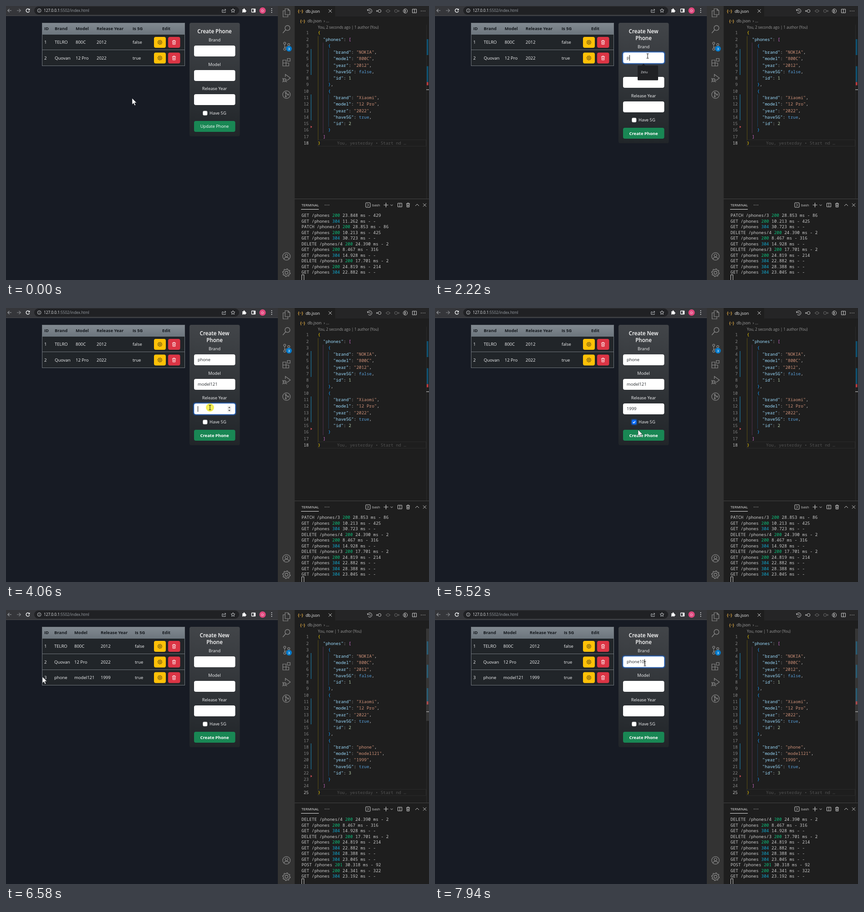
Animation, 929 px wide and 603 px high, one loop 8 s. Source, as an HTML page with a canvas:

```html
<!DOCTYPE html>
<html lang="en">
<head>
<meta charset="utf-8">
<title>Phone list</title>
<style>
html, body { margin: 0; width: 100%; height: 100%; overflow: hidden; background: #171b24; }
canvas { display: block; }
</style>
</head>
<body>
<canvas id="stage" width="929" height="603"></canvas>
<script>
const ctx = document.getElementById('stage').getContext('2d');
const LOOP = 8000, TAU = Math.PI * 2;
const UI = '"Open Sans", "Noto Sans", sans-serif';
const MONO = '"Noto Sans Mono", "DejaVu Sans Mono", monospace';

// ---------- drawing helpers ----------
function rect(x, y, w, h, fill) { ctx.fillStyle = fill; ctx.fillRect(x, y, w, h); }

function box(x, y, w, h, r, fill, stroke, lw = 1) {
  ctx.beginPath();
  ctx.roundRect(x, y, w, h, r);
  if (fill) { ctx.fillStyle = fill; ctx.fill(); }
  if (stroke) { ctx.strokeStyle = stroke; ctx.lineWidth = lw; ctx.stroke(); }
}

function disc(x, y, r, fill) {
  ctx.beginPath(); ctx.arc(x, y, r, 0, TAU); ctx.fillStyle = fill; ctx.fill();
}

// Writes text centred vertically on cy and returns its width.
function text(s, x, cy, size, color, { weight = 400, align = 'left', font = UI } = {}) {
  ctx.font = `${weight} ${size}px ${font}`;
  ctx.textAlign = align;
  ctx.fillStyle = color;
  ctx.fillText(s, x, cy + size * 0.36);
  return ctx.measureText(s).width;
}

// Draws path data centred on (x, y); filled when lw is 0.
function icon(d, x, y, color, lw = 1, scale = 1) {
  ctx.save();
  ctx.translate(x, y);
  ctx.scale(scale, scale);
  const p = new Path2D(d);
  if (lw) { ctx.strokeStyle = color; ctx.lineWidth = lw; ctx.stroke(p); }
  else { ctx.fillStyle = color; ctx.fill(p); }
  ctx.restore();
}

function gear(x, y, r, color, lw) {
  ctx.beginPath();
  for (let i = 0; i <= 32; i++) {
    const a = (i + 0.5) / 32 * TAU, k = i % 4 < 2 ? r : r * 0.78;
    ctx.lineTo(x + Math.cos(a) * k, y + Math.sin(a) * k);
  }
  ctx.closePath();
  ctx.moveTo(x + r * 0.38, y);
  ctx.arc(x, y, r * 0.38, 0, TAU);
  ctx.strokeStyle = color; ctx.lineWidth = lw; ctx.stroke();
}

function gradient(y, h, top, bottom) {
  const g = ctx.createLinearGradient(0, y, 0, y + h);
  g.addColorStop(0, top);
  g.addColorStop(1, bottom);
  return g;
}

const ring = (r, x = 0, y = 0) => `M${x + r} ${y}a${r} ${r} 0 1 1 ${-2 * r} 0a${r} ${r} 0 1 1 ${2 * r} 0`;
const CROSS = 'M-3.5-3.5L3.5 3.5M3.5-3.5L-3.5 3.5';
const TRASH = 'M-4-3H4M-1.5-3V-4.3H1.5V-3M-3-3L-2.6 4.5H2.6L3-3M-1-1V3M1-1V3';
const SPLIT = 'M-4.5-4H4.5V4H-4.5ZM0-4V4';
const DOTS = ring(0.8, -4) + ring(0.8) + ring(0.8, 4);

// ---------- data ----------
const phones = [
  { brand: 'NOKIA', model: '800C', year: '2012', have5G: false, id: 1 },
  { brand: 'Xiaomi', model: '12 Pro', year: '2022', have5G: true, id: 2 },
  { brand: 'phone', model: 'model121', year: '1999', have5G: true, id: 3 }
];
const labels = ['TELRO', 'Quovan', 'phone'];
const recent = ['Zelu', 'phone', 'phone1', 'brand', 'test', 'new'];

const logs = [
  'GET /phones 200 23.848 ms - 429', 'GET /phones 304 11.262 ms - -',
  'PATCH /phones/3 200 28.853 ms - 86', 'GET /phones 200 10.213 ms - 425',
  'GET /phones 304 30.723 ms - -', 'DELETE /phones/4 200 24.390 ms - 2',
  'GET /phones 200 8.467 ms - 316', 'GET /phones 304 14.928 ms - -',
  'DELETE /phones/3 200 17.701 ms - 2', 'GET /phones 200 24.819 ms - 214',
  'GET /phones 304 22.882 ms - -', 'GET /phones 304 28.388 ms - -',
  'GET /phones 304 23.045 ms - -', 'POST /phones 201 30.318 ms - 92',
  'GET /phones 200 24.341 ms - 322', 'GET /phones 304 23.192 ms - -'
];
const logTimes = [780, 860, 5640, 5680, 5720];

// Pointer stops: time, x, y
const stops = [
  [120, 277, 203], [560, 54, 12], [1240, 54, 12], [1700, 467, 110],
  [3480, 467, 110], [3980, 448, 219], [4860, 448, 219], [5000, 437, 251],
  [5240, 437, 251], [5520, 446, 268], [5570, 449, 276], [5740, 449, 276],
  [6520, 80, 147], [6580, 80, 147], [6780, 198, 149], [7240, 461, 118]
];
const clicks = [580, 1740, 4030, 5030, 5590, 7280];

const RELOAD = 700, SENT = 5680, SYNCED = 6000;

// ---------- timing ----------
const typed = (s, t, start, step) => s.slice(0, Math.max(0, Math.floor((t - start) / step) + 1));
const within = (t, a, b) => t >= a && t < b;

function pointer(t) {
  let a = stops[0];
  for (const b of stops) {
    if (t < b[0]) {
      if (a === b) break;
      const p = (t - a[0]) / (b[0] - a[0]), e = p * p * (3 - 2 * p);
      return [a[1] + (b[1] - a[1]) * e, a[2] + (b[2] - a[2]) * e];
    }
    a = b;
  }
  return [a[1], a[2]];
}

function formState(t) {
  const f = { brand: '', model: '', year: '', checked: false, focus: '', hints: 0 };
  if (t < SENT) {
    f.brand = t < 2220 ? '' : 'p' + typed('hone', t, 2380, 76.6);
    f.model = typed('model121', t, 2763, 76.6);
    f.year = typed('1999', t, 4360, 160);
    f.checked = t >= 5050;
    f.focus = t < 1740 ? '' : t < 2686 ? 'brand' : t < 4040 ? 'model' : t < 5040 ? 'year' : t < 5600 ? 'check' : '';
    f.hints = within(t, 1860, 2220) ? 6 : within(t, 2220, 2240) ? 1 : 0;
  } else if (t >= 7280) {
    f.focus = 'brand';
    f.brand = typed('phone10', t, 7460, 80);
    f.hints = within(t, 7360, 7460) ? 6 : within(t, 7460, 7480) ? 1 : 0;
  }
  return f;
}

// ---------- browser ----------
function toolbar(hover) {
  rect(0, 0, 598, 21, '#35363a');
  rect(0, 21, 598, 1, '#4a4c50');
  box(62, 1, 450, 18, 9, '#202124');
  if (hover) disc(48, 10, 9, '#54565a');
  icon('M4 0H-4M-0.5-3.7L-4.2 0L-0.5 3.7', 8, 10, '#9a9ca0', 1.2);
  icon('M-4 0H4M0.5-3.7L4.2 0L0.5 3.7', 28, 10, '#85878b', 1.2);
  icon('M3.4-1.7A3.8 3.8 0 1 0 3.6 1.2', 48, 10, '#f1f3f4', 1.5);
  icon('M4.4-4.5V-0.5H0.4Z', 48, 10, '#f1f3f4', 0);
  icon(ring(3.9) + 'M0-0.5V2.2M0-2.3V-1.3', 73, 10, '#c4c7ca', 1);
  const w = text('127.0.0.1', 83, 10, 8.25, '#e8eaed');
  text(':5502/index.html', 83 + w, 10, 8.25, '#9aa0a6');
  icon('M-1.5-2H-4.2V3.6H3V1.5M-1.5 1.2C-1-1.5 1-2 3.8-2M1.6-4.2L4-2L1.6 0.2', 479, 10.5, '#c4c7ca');
  icon('M0-4.2L1.3-1.4L4.2-1.1L2 1L2.7 4L0 2.4L-2.7 4L-2 1L-4.2-1.1L-1.3-1.4Z', 498.5, 10, '#d5d7da');
  icon('M-4-2.6H-1.3A1.4 1.4 0 1 1 1.2-2.6H3V-0.2A1.4 1.4 0 1 1 3 2.4V4.3H0.8A1.4 1.4 0 0 0-1.8 4.3H-4V1.8A1.4 1.4 0 0 0-4-0.6Z', 523, 10, '#fff', 0);
  box(539.5, 6.5, 8, 7, 0.5, null, '#fff', 1.3);
  rect(544, 6, 4, 8, '#fff');
  disc(563.5, 10, 7, '#e0487e');
  text('D', 563.5, 10, 7.5, '#fff', { align: 'center' });
  for (const y of [6, 10, 14]) disc(583.5, y, 1, '#e8eaed');
}

function table(count) {
  const cols = count > 2 ? [84, 106, 150, 208, 283, 343] : [84, 107, 153, 199, 278, 343];
  const rowH = 34.4, h = Math.round(26 + rowH * count), edge = '#70767c';
  rect(79, 37, 314, h, '#212529');
  rect(79, 37, 314, 26, gradient(37, 26, '#828a91', '#6c757d'));
  ['ID', 'Brand', 'Model', 'Release Year', 'Is 5G', 'Edit'].forEach((s, i) =>
    text(s, cols[i], 50, 9.4, '#14181d', { weight: 700 }));
  for (let i = 0; i < count; i++) {
    const p = phones[i], y = 63 + rowH * i, cy = y + 17;
    [p.id, labels[i], p.model, p.year, p.have5G].forEach((s, c) =>
      text(String(s), cols[c], cy, 9.5, '#f4f5f6'));
    box(325, cy - 12, 26, 24, 4, '#ffc107');
    gear(338, cy, 4.8, '#1c1c1c', 0.8);
    box(356, cy - 12, 26.5, 24, 4, '#dc3545');
    icon(TRASH, 369, cy, '#fff', 0.9);
    rect(79, Math.round(y + rowH) - 1, 314, 1, edge);
  }
  box(79.5, 37.5, 313, h - 1, 0, null, edge);
}

function input(y, value, focused) {
  if (focused) box(410.5, y - 2.5, 95.5, 29, 6, 'rgba(13,110,253,.35)');
  box(413, y, 90.5, 24, 4, '#fff', focused && '#5b9bf8', 0.8);
  const w = text(value, 421, y + 12, 9.3, '#212529');
  if (focused) rect(Math.round(421 + w), y + 6, 1, 12.5, '#111');
}

function form(t, f, hot) {
  const fresh = t >= RELOAD, dy = fresh ? 15.2 : 0, mid = { align: 'center' };
  const title = { weight: 600, align: 'center' };
  box(403, 37, 110.5, 249.8 + dy, 4, gradient(37, 250 + dy, '#424549', '#212529'));
  text(fresh ? 'Create New' : 'Create Phone', 458, 55.5, 11.6, '#fff', title);
  if (fresh) text('Phone', 458, 71, 11.6, '#fff', title);

  ['Brand', 'Model', 'Release Year'].forEach((s, i) => {
    const key = ['brand', 'model', 'year'][i], y = Math.round(86.9 + dy + i * 53.7);
    text(s, 458, y - 12, 9.3, '#f4f5f6', mid);
    input(y, f[key], f.focus === key);
    if (key === 'year' && f.focus === key) {
      rect(486, y + 5, 9, 14.5, '#efefef');
      icon('M-2.5-2H2.5L0-5ZM-2.5 2H2.5L0 5Z', 490.5, y + 12.2, '#505050', 0);
    }
  });

  const cy = 235.8 + dy;
  if (f.focus === 'check') box(430, cy - 7.3, 14.6, 14.6, 4, 'rgba(13,110,253,.3)');
  box(432.5, cy - 4.8, 9.6, 9.6, 2.4, f.checked ? '#0d6efd' : '#fff', f.checked ? '#0d6efd' : '#bfbfbf', 0.6);
  if (f.checked) icon('M-2.3 0.2L-0.7 1.9L2.4-1.6', 437.3, cy, '#fff', 1.4);
  text('Have 5G', 447, cy, 9.4, '#f4f5f6');
  box(413, Math.round(253 + dy), 90.5, 24, 4, hot ? '#157347' : '#198754');
  text(fresh ? 'Create Phone' : 'Update Phone', 458, 265 + dy, 9.4, '#fff',
    { weight: fresh ? 700 : 400, align: 'center' });

  if (f.hints) {
    icon('M-4.5 4.5L0 0L4.5 4.5Z', 458, 127, '#202124', 0);
    box(445, 131, 45, 12 + 20.5 * f.hints, 1.5, '#202124');
    for (let i = 0; i < f.hints; i++) text(recent[i], 452, 145.5 + i * 20.5, 7.6, '#e8eaed');
  }
}

function drawPointer(t, x, y, hot) {
  for (const c of clicks) {
    const age = (t - c) / 240;
    if (age >= 0 && age < 1) disc(x, y, 9, `rgba(240,232,40,${0.8 * Math.min(1, 2.5 * (1 - age))})`);
  }
  const inField = x > 413 && x < 503 && [102, 156, 209].some(top => y > top && y < top + 24);
  if (inField) {
    icon('M-2.5-5H-0.7L0-4.4L0.7-5H2.5M0-4.4V4.4M-2.5 5H-0.7L0 4.4L0.7 5H2.5', x, y, '#222', 1.1);
  } else if (hot) {
    const hand = 'M-1 0C0-1 1.2 0 1.2 1V5.5C4 5 7.5 5.5 7.5 8V11L6 15H-1L-4.5 9.5C-5 8-3.5 7.5-2.5 8.5L-1.3 9.8Z';
    icon(hand, x, y, '#fff', 0);
    icon(hand, x, y, '#111', 0.8);
  } else {
    const arrow = 'M0 0V13L3 10.2L5.2 15L7.2 14.1L5.1 9.4H9.2Z';
    icon(arrow, x, y, '#fff', 0, 1.06);
    icon(arrow, x, y, '#22252b', 0.6, 1.06);
  }
}

// ---------- editor ----------
function activityBar() {
  const c = '#8a8a8a';
  rect(597, 0, 37, 603, '#333333');
  icon('M-3-9H3.5L7.5-5V4H-3ZM3.5-9V-5H7.5M-3-4.5H-7.5V9H3V4', 616, 15, c, 1.2);
  icon(ring(5.4, 2.2, -2.6) + 'M-1.7 1.3L-8 8.5', 616, 51, c, 1.3);
  icon(ring(2.4, -4, -6) + ring(2.4, -4, 7) + ring(2.4, 5, -3) + 'M-4-3.6V4.6M5-0.6C5 3-4 1-4 4.6', 616, 88, c, 1.2);
  disc(621.5, 94, 6.2, '#007acc');
  text('3', 621.5, 94, 7, '#fff', { align: 'center', weight: 600 });
  icon('M-8-5H-1V8H-8ZM-8 1.5H5V8H-1M-1 1.5H5V8M2-8.5H8V-2.5H2Z', 616, 124, c, 1.2);
  icon('M-2.5-3V-8.5L8.5-0.5L1 5' + ring(3.4, -4, 4) + 'M-7.4 4H-0.6M-9 0L-6.6 2M-9 8.5L-6.8 6.6M1 8.5L-1.2 6.6', 616, 159, c, 1.2);
  icon(ring(8.3) + ring(1.3, -1.5, -4) + ring(1.3, -1.5, 4) + ring(1.3, 3.5, 0) + 'M-1.5-2.7V2.7M-1-2.8L2.5-0.7', 616, 195, c, 1.2);
  icon(ring(8.3) + ring(3, 0, -2) + 'M-5.5 6C-4 0.5 4 0.5 5.5 6', 616, 551, c, 1.2);
  gear(616, 587, 8.5, c, 1.3);
}

function tabs(synced) {
  rect(634, 0, 295, 603, '#1e1e1e');
  rect(723, 0, 206, 23, '#252526');
  const braces = { weight: 700 };
  text('{··}', 641, 11, 8.5, '#d9a441', braces);
  text('db.json', 658, 11.5, 9.1, '#f2f2f2');
  icon(CROSS, 712, 11, '#d0d0d0');
  const c = '#cfcfcf', dim = '#6a6a6a';
  icon('M-4.6-1A4.7 4.7 0 1 1-3.6 3M-5-4V-0.8H-1.8M0-2.5V0.5L2 1.7', 799, 11, c);
  icon(ring(3.2, 1.5) + 'M-1.7 0H-5.5M-3.6-2L-5.6 0L-3.6 2', 819, 11, c);
  icon(ring(3) + 'M-5.5 0H-3M3 0H5.5', 839, 11, dim);
  icon(ring(3.2, -1.5) + 'M1.7 0H5.5M3.6-2L5.6 0L3.6 2', 858, 11, dim);
  icon(ring(4.6) + ring(0.9, -1, -1.7) + ring(0.9, -1, 2) + 'M-1-1V1.2M-0.5-1L2 0.7', 877, 11, c);
  icon(SPLIT, 897, 11, c);
  icon(DOTS, 916, 11, c, 0);
  text('{··}', 646, 33, 8, '#d9a441', braces);
  text('db.json  › ...', 662, 33, 9, '#a5a5a5');
  text(synced ? 'You, now | 1 author (You)' : 'You, 2 seconds ago | 1 author (You)', 685, 47, 8.1, '#999999');
}

const PITCH = 14.26;
const lineY = n => 59 + (n - 1) * PITCH;
const BRACKETS = ['#ffd700', '#da70d6', '#179fff'];

function tokenColor(tok, isKey, depth) {
  if (/[{}[\]]/.test(tok)) return BRACKETS[depth];
  if (tok[0] === '"') return isKey ? '#9cdcfe' : '#ce9178';
  if (/true|false/.test(tok)) return '#569cd6';
  return /\d/.test(tok) ? '#b5cea8' : '#d4d4d4';
}

function code(count, marked) {
  const lines = JSON.stringify({ phones: phones.slice(0, count) }, null, 2).split('\n');
  const last = lines.length, mono = { font: MONO };

  box(684.5, Math.round(lineY(last)) - 6.5, 238, 14, 0, null, '#2a2a2a');
  const guide = (col, a, b) => {
    ctx.globalAlpha = 0.27;
    rect(Math.round(685 + col * 5.65), lineY(a) - 7, 1, (b - a + 1) * PITCH, BRACKETS[col / 2]);
    ctx.globalAlpha = 1;
  };
  guide(0, 2, last - 1);
  guide(2, 3, last - 2);

  for (let i = 0; i < count; i++) guide(4, 4 + i * 7, 8 + i * 7);
  lines.forEach((line, i) => {
    const y = lineY(i + 1), indent = line.search(/\S/);
    text(String(i + 1), 665, y, 9.4, i + 1 === last ? '#c6c6c6' : '#858585', { font: MONO, align: 'right' });
    let x = 685;
    for (const [tok] of line.matchAll(/"[^"]*"|true|false|\d+|[{}[\]]|[^"{}[\]\dtf]+/g)) {
      const isKey = x < 685 + (indent + 1) * 5.65;
      x += text(tok, x, y, 9.4, tokenColor(tok, isKey, Math.min(2, indent / 2)), mono);
    }
  });
  text('You, yesterday • Start nd …', 727, lineY(last), 9.4, '#525252', mono);

  // change marks in the gutter and on the ruler
  for (let i = 0; i < marked; i++) {
    const top = Math.round(lineY(4 + i * 7) - 7);
    rect(669, top, 2, 57, '#1d3f4e');
    for (let y = 0; y < 57; y += 3) rect(669, top + y, 2, 1.4, '#1f7196');
  }
  icon('M0-2.5L3.5 0L0 2.5Z', 669, lineY(marked * 7 + 2) - 7, '#c94f55', 0);

  const edited = marked > 2;
  rect(923, 41, 1, 384, '#2b2b2b');
  const step = edited ? 51.5 : 59.5, len = edited ? 29 : 35, top = edited ? 69 : 73;
  for (let i = 0; i < marked; i++) rect(924, top + i * step, 3.5, len, '#0d5273');
  const end = top + (marked - 1) * step + len;
  rect(924, end, 3.5, 7, '#c23b3f');
  if (edited) rect(923, 41, 6, 203, 'rgba(121,121,121,.25)');
  rect(923, end + (edited ? 22 : 16), 6, 1.5, '#a0a0a0');
}

function terminal(t) {
  const c = '#cccccc';
  rect(634, 424, 295, 179, '#1e1e1e');
  rect(634, 424, 295, 1, '#454545');
  text('TERMINAL', 649, 438, 7.9, '#e7e7e7');
  rect(648, 447, 39, 1, '#e7e7e7');
  icon(DOTS, 705, 438, c, 0);
  box(790, 433, 10, 10, 1, null, c);
  icon('M-1.5-2.5L1.5 0L-1.5 2.5', 795, 438, c);
  text('bash', 804, 438, 7.8, c);
  icon('M-5 0H5M0-5V5', 834.5, 438, c, 1.2);
  icon('M-2.5-1L0 1.5L2.5-1', 847, 438, c);
  icon(SPLIT, 865, 438, c);
  icon(TRASH, 883, 438, c);
  icon('M-4 2L0-2L4 2', 903, 438, c);
  icon(CROSS, 919.5, 438, c);

  const shown = 11 + logTimes.filter(at => t >= at).length;
  logs.slice(shown - 11, shown).forEach((line, i) => {
    let x = 649;
    for (const part of line.split(/( \d{3} )/)) {
      const color = /^ 20/.test(part) ? '#0dbc79' : /^ 304/.test(part) ? '#11a8cd' : c;
      x += text(part, x, 461 + i * 12.5, 9.4, color, { font: MONO });
    }
  });
  box(649.5, 591.5, 5, 13, 0, null, '#d0d0d0');
}

// ---------- main ----------
function draw(t) {
  const [x, y] = pointer(t);
  const hot = x > 413 && x < 503 && y > 268.5 && y < 292;
  const sent = t >= SENT, synced = t >= SYNCED;
  rect(0, 0, 929, 603, '#171b24');
  toolbar(y < 21);
  table(sent ? 3 : 2);
  form(t, formState(t), hot);
  activityBar();
  tabs(synced);
  code(sent ? 3 : 2, synced ? 3 : 2);
  terminal(t);
  drawPointer(t, x, y, hot);
}

function tick() {
  draw(performance.now() % LOOP);
  requestAnimationFrame(tick);
}
tick();
</script>
</body>
</html>
```
